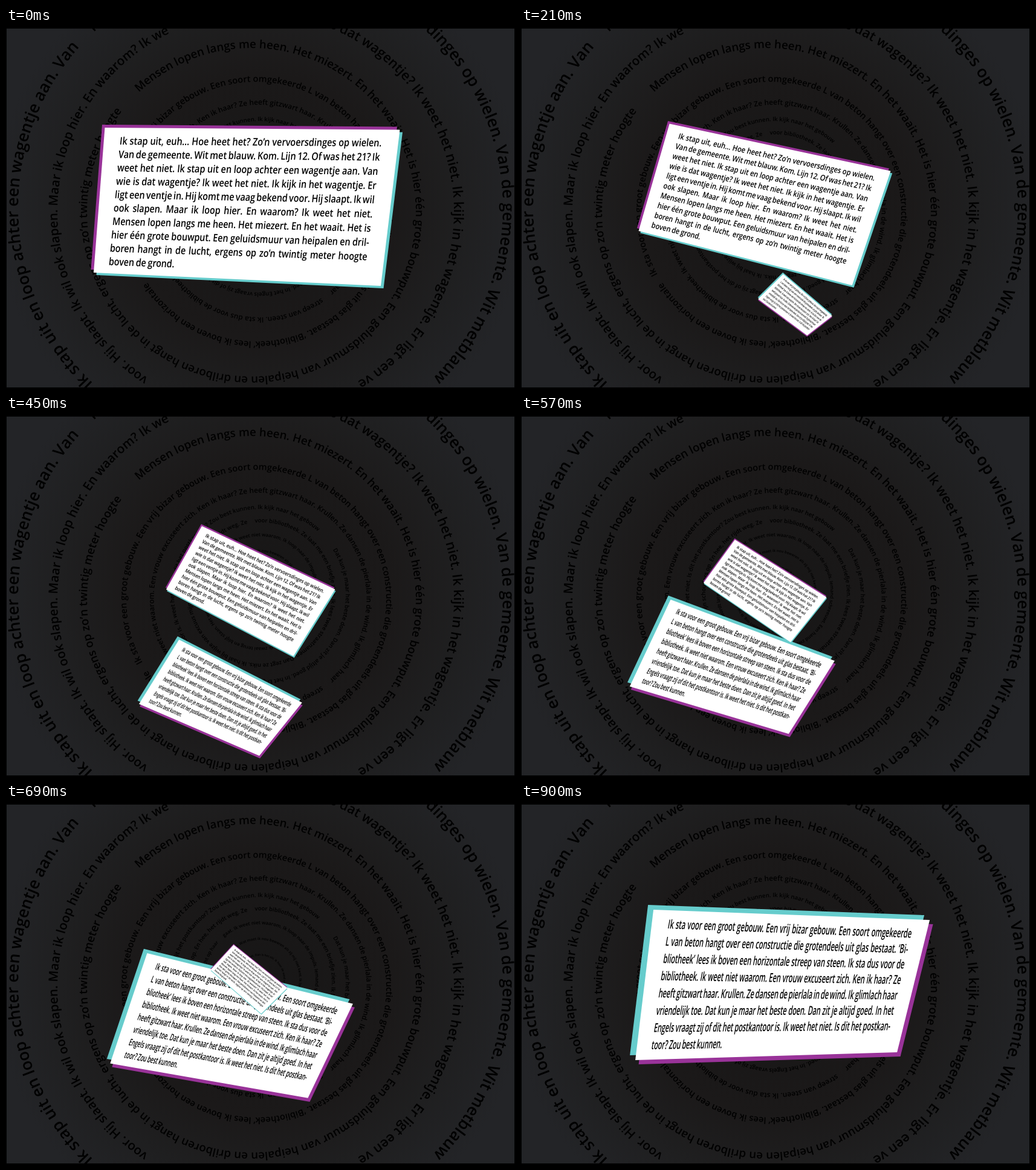
These frames come from a looping animation (842 by 596 pixels, 930 ms). An HTML page with a canvas:

```html
<!DOCTYPE html>
<html lang="nl">
<head>
<meta charset="utf-8">
<title>Tekstspiraal</title>
<style>
  html, body { margin: 0; width: 842px; height: 596px; overflow: hidden; background: #1b1919; }
  canvas { display: block; }
</style>
</head>
<body>
<canvas id="stage" width="842" height="596"></canvas>
<script>
const W = 842, H = 596, LOOP = 930, STEP = 30, SPAN = 900, TURN = 50;
const FACE = '"Open Sans", "Noto Sans", sans-serif';
const PURPLE = '#993399', TEAL = '#66cccc';
const WEIGHT = 600, FONT_SIZE = 17, LEADING = 22.5;

const stage = document.getElementById('stage').getContext('2d');
const rad = deg => deg * Math.PI / 180;
const mix = (a, b, k) => a + (b - a) * k;
const mixPoint = (p, q, k) => [mix(p[0], q[0], k), mix(p[1], q[1], k)];

// Sets text clockwise on a circle; the type size follows from the arc it fills.
function arcText(ctx, cx, cy, r, from, sweep, text) {
  const chars = [...text];
  ctx.font = `${WEIGHT} 100px ${FACE}`;
  const widths = chars.map(c => ctx.measureText(c).width);
  const total = widths.reduce((a, b) => a + b);
  ctx.font = `${WEIGHT} ${100 * rad(sweep) * r / total}px ${FACE}`;
  ctx.textAlign = 'center';
  let done = 0;
  chars.forEach((c, i) => {
    ctx.save();
    ctx.translate(cx, cy);
    ctx.rotate(rad(from + sweep * (done + widths[i] / 2) / total));
    ctx.fillText(c, 0, -r);
    ctx.restore();
    done += widths[i];
  });
}

function makeBackdrop() {
  const canvas = document.createElement('canvas');
  canvas.width = W;
  canvas.height = H;
  const ctx = canvas.getContext('2d');
  const glow = ctx.createRadialGradient(421, 296, 0, 421, 296, 440);
  glow.addColorStop(0, '#171616');
  glow.addColorStop(0.5, '#1b1919');
  glow.addColorStop(0.75, '#1f1f20');
  glow.addColorStop(1, '#232427');
  ctx.fillStyle = glow;
  ctx.fillRect(0, 0, W, H);
  ctx.strokeRect(0.5, 0.5, W - 1, H - 1);
  ctx.fillStyle = '#000';
  const rings = [
    [421, 298, 401, 316.5, 3, 'Ik'],
    [421, 298, 401, 42.7, 92, 'dinges op wielen. Van de gemeente. Wit metblauw'],
    [421, 298, 401, 223.7, 88, 'Ik stap uit en loop achter een wagentje aan. Van'],
    [413, 304, 328, 20.8, 128.4, 'is dat wagentje? Ik weet het niet. Ik kijk in het wagentje. Er ligt een ve'],
    [413, 304, 328, 212.8, 121.5, 'voor. Hij slaapt. Ik wil ook slapen. Maar ik loop hier. En waarom? Ik we'],
    [406, 305, 272, 316.8, 351.2, 'Mensen lopen langs me heen. Het miezert. En het waait. Het is hier één grote bouwput. Een geluidsmuur van heipalen en drilboren hangt in de lucht, ergens op zo’n twintig meter hoogte'],
    [414, 304, 215, 241, 356, 'Ik sta voor een groot gebouw. Een vrij bizar gebouw. Een soort omgekeerde L van beton hangt over een constructie die grotendeels uit glas bestaat. ‘Bibliotheek’ lees ik boven een horizontale'],
    [420.5, 303, 176, 145, 354.5, 'streep van steen. Ik sta dus voor de bibliotheek. Ik weet niet waarom. Een vrouw excuseert zich. Ken ik haar? Ze heeft gitzwart haar. Krullen. Ze dansen de pierlala in de wind. Ik glimlach haar'],
    [420, 296, 142, 58.3, 344, 'Dat kun je maar het beste doen. Dan zit je altijd goed. In het Engels vraagt zij of dit het postkantoor is. Ik weet het niet. Is dit het postkantoor? Zou best kunnen. Ik kijk naar het gebouw'],
    [422, 293, 117, -5, 354, 'voor bibliotheek. Ze laat me een briefje zien. Ik lees twee straatnamen. Dan zegt ze niks. Ik haal bij wijze van excuus mijn schouders op. En hee, het rijdt weg. Ze'],
    [420, 291, 92, -40, 352, 'gaat. Ik weet niet waarom. Ik loop naar de impuls. Iemand schreeuwt. Een hand zwaait. Ik zwaai terug en blijf staan. Het wordt later. Ik wacht op haar'],
    [420, 290, 65, -50, 352, 'en kijk. Wat moet ik nou beweren als zij mij niet kent. Ik loop weer verder. De muur is hoog. Het miezert nog. Ik tel de ramen tot het eind'],
    [420, 290, 39, -60, 350, 'van de straat. Dan is het stil. Ik hoor de wind en het water. Ik sta nog even stil en ga dan terug naar huis']
  ];
  rings.forEach(ring => arcText(ctx, ...ring));
  return canvas;
}

// Quads run clockwise from top left; "first" and "last" are the ends of those baselines.
const cards = [
  {
    pivot: [426.5, 300.5],
    quad: [[219, 175], [676, 192], [622, 411], [189, 424]],
    shades: [[TEAL, -9, -8], [PURPLE, 5.5, 7]],
    first: [[242, 206], [645, 221.5]],
    last: [[215, 406], [604, 400]],
    measure: 620,
    lines: [
      'Ik sta voor een groot gebouw. Een vrij bizar gebouw. Een soort omgekeerde',
      'L van beton hangt over een constructie die grotendeels uit glas bestaat. ‘Bi-',
      'bliotheek’ lees ik boven een horizontale streep van steen. Ik sta dus voor de',
      'bibliotheek. Ik weet niet waarom. Een vrouw excuseert zich. Ken ik haar? Ze',
      'heeft gitzwart haar. Krullen. Ze dansen de pierlala in de wind. Ik glimlach haar',
      'vriendelijk toe. Dat kun je maar het beste doen. Dan zit je altijd goed. In het',
      'Engels vraagt zij of dit het postkantoor is. Ik weet het niet. Is dit het postkan-',
      'toor? Zou best kunnen.'
    ],
    pose: k => ({ scale: k, angle: TURN * (1 - k), at: along(path, (k * SPAN + 30) / 120) })
  },
  {
    pivot: [402, 289.5],
    quad: [[163.5, 165], [651.5, 168.5], [620, 427], [145, 405]],
    shades: [[PURPLE, -4.5, -5], [TEAL, 4.5, 4]],
    first: [[187.5, 193], [621, 196]],
    last: [[169.5, 392.5], [594, 408]],
    measure: 510,
    lines: [
      'Ik stap uit, euh... Hoe heet het? Zo’n vervoersdinges op wielen.',
      'Van de gemeente. Wit met blauw. Kom. Lijn 12. Of was het 21? Ik',
      'weet het niet. Ik stap uit en loop achter een wagentje aan. Van',
      'wie is dat wagentje? Ik weet het niet. Ik kijk in het wagentje. Er',
      'ligt een ventje in. Hij komt me vaag bekend voor. Hij slaapt. Ik wil',
      'ook slapen. Maar ik loop hier. En waarom? Ik weet het niet.',
      'Mensen lopen langs me heen. Het miezert. En het waait. Het is',
      'hier één grote bouwput. Een geluidsmuur van heipalen en dril-',
      'boren hangt in de lucht, ergens op zo’n twintig meter hoogte',
      'boven de grond.'
    ],
    pose: k => ({
      scale: 1 - k,
      angle: TURN * k,
      at: [402 + 4.2 * Math.sin(Math.PI * k * 9 / 7), 289.5 - 2.4 * k + 6.5 * k ** 3]
    })
  }
];

// Flight of the arriving card, one point every 120 ms from -30 ms on.
const path = [
  [515, 383], [490, 426], [453.5, 460.5], [404.75, 483.25], [353.75, 471],
  [347.25, 420.75], [369.75, 373.5], [400, 331], [432.5, 294]
];

// Catmull-Rom curve through the points.
function along(points, u) {
  const i = Math.floor(u), f = u - i;
  const point = n => points[Math.max(0, Math.min(points.length - 1, n))];
  const [a, b, c, d] = [-1, 0, 1, 2].map(n => point(i + n));
  return [0, 1].map(n => b[n] + f / 2 * (c[n] - a[n]
    + f * (2 * a[n] - 5 * b[n] + 4 * c[n] - d[n]
    + f * (3 * (b[n] - c[n]) + d[n] - a[n]))));
}

function fillQuad(ctx, quad, color, dx = 0, dy = 0) {
  ctx.fillStyle = color;
  ctx.beginPath();
  quad.forEach(([x, y]) => ctx.lineTo(x + dx, y + dy));
  ctx.fill();
}

// Justified paragraph whose baselines fan out between the first and the last.
function drawParagraph(ctx, { first, last, measure, lines }) {
  const end = lines.length - 1;
  const down = [0, 1].map(n =>
    (last[0][n] - first[0][n] + last[1][n] - first[1][n]) / 2 / end / LEADING);
  ctx.fillStyle = '#000';
  ctx.font = `${WEIGHT} ${FONT_SIZE}px ${FACE}`;
  ctx.textAlign = 'left';
  lines.forEach((line, i) => {
    const left = mixPoint(first[0], last[0], i / end);
    const right = mixPoint(first[1], last[1], i / end);
    const words = line.split(' ');
    const widths = words.map(w => ctx.measureText(w).width);
    const gap = i === end ? FONT_SIZE * 0.2
      : (measure - widths.reduce((a, b) => a + b)) / (words.length - 1);
    ctx.save();
    ctx.transform((right[0] - left[0]) / measure, (right[1] - left[1]) / measure, ...down, ...left);
    let x = 0;
    words.forEach((word, n) => {
      ctx.fillText(word, x, 0);
      x += widths[n] + gap;
    });
    ctx.restore();
  });
}

function drawCard(ctx, card, k) {
  const { scale, angle, at } = card.pose(k);
  if (scale <= 0) return;
  ctx.save();
  ctx.translate(...at);
  ctx.rotate(rad(angle));
  ctx.scale(scale, scale);
  ctx.translate(-card.pivot[0], -card.pivot[1]);
  card.shades.forEach(shade => fillQuad(ctx, card.quad, ...shade));
  fillQuad(ctx, card.quad, '#fff');
  drawParagraph(ctx, card);
  ctx.restore();
}

const backdrop = makeBackdrop();

function render(now) {
  const t = Math.floor(now % LOOP / STEP) * STEP;
  stage.drawImage(backdrop, 0, 0);
  cards.forEach(card => drawCard(stage, card, t / SPAN));
  requestAnimationFrame(render);
}
render(0);
</script>
</body>
</html>
```
